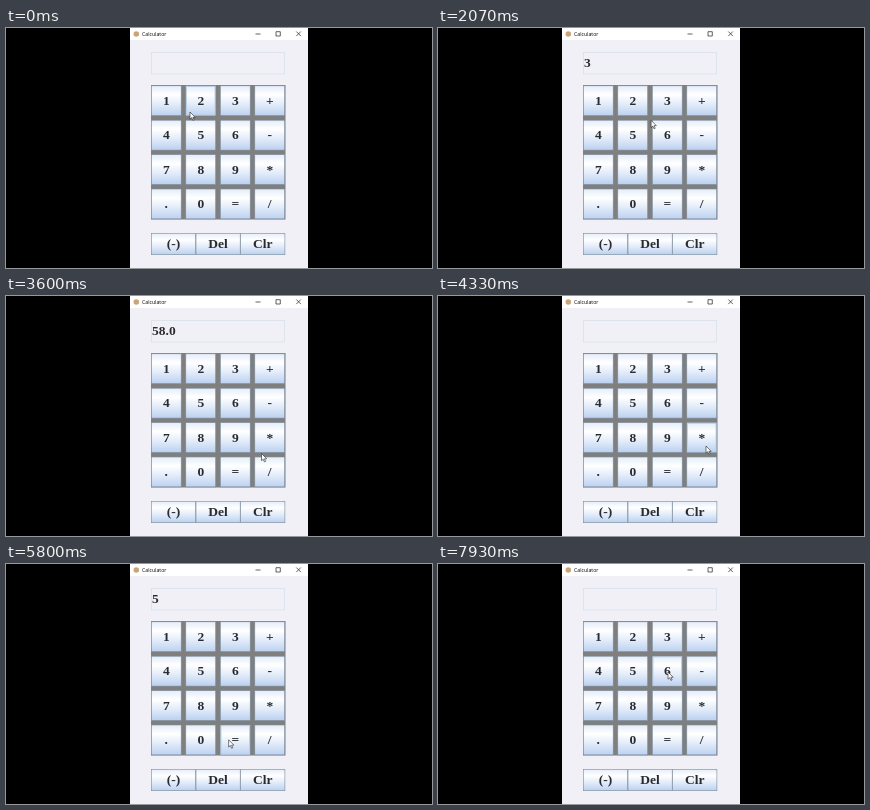
An HTML page that plays this animation: 426 px wide and 240 px high, repeating every 8 s.

```html
<!DOCTYPE html>
<html lang="en">
<head>
<meta charset="utf-8">
<title>Calculator</title>
<style>
  html, body { margin: 0; width: 100%; height: 100%; overflow: hidden; background: #000; }
  svg { display: block; width: 100vw; height: 100vh; }
  .label { font: bold 13.5px "Liberation Serif", serif; fill: #2b2b2f; }
  .mid { text-anchor: middle; }
  .title { font: 5.2px "Open Sans", sans-serif; fill: #000; }
  .line { fill: none; stroke: #222; stroke-width: .7; }
</style>
</head>
<body>
<svg id="stage" viewBox="0 0 426 240">
  <defs>
    <linearGradient id="face" x1="0" y1="0" x2="0" y2="1">
      <stop offset="0" stop-color="#e4edfa"/>
      <stop offset=".3" stop-color="#fff"/>
      <stop offset=".6" stop-color="#e4edfa"/>
      <stop offset="1" stop-color="#bbd1f0"/>
    </linearGradient>
  </defs>
</svg>
<script>
const stage = document.getElementById('stage');

function add(tag, attrs, text) {
  const node = document.createElementNS('http://www.w3.org/2000/svg', tag);
  for (const key in attrs) node.setAttribute(key, attrs[key]);
  if (text) node.textContent = text;
  return stage.appendChild(node);
}
const rect = (x, y, width, height, style) => add('rect', { x, y, width, height, ...style });

// Window
rect(124, 0, 178, 240, { fill: '#f1f0f7' });
rect(124, 0, 178, 12, { fill: '#fff' });
add('circle', { cx: 130.3, cy: 6, r: 2.8, fill: '#c9a57a' });
add('text', { x: 136, y: 7.9, class: 'title' }, 'Calculator');
add('path', { d: 'M249.5 6H254.5M270 3.7h4.3v4.3h-4.3zM290.3 3.5l4.6 4.6M294.9 3.5l-4.6 4.6', class: 'line' });

// Display and keypad
rect(145.5, 24.5, 133, 21.5, { fill: 'none', stroke: '#d3dfea', 'stroke-width': .7 });
const display = add('text', { x: 146, y: 39, class: 'label' });
rect(145, 57, 134.5, 134.5, { fill: '#7f7f80' });

const buttons = [];
function addButton(name, x, y, w, h, baseline) {
  const face = rect(x + .3, y + .3, w - .6, h - .6,
    { fill: 'url(#face)', stroke: '#7a8a99', 'stroke-width': .6 });
  const glow = rect(x + 1, y + 1, w - 2, h - 2,
    { fill: 'none', stroke: '#b8cfe5', 'stroke-width': .9 });
  add('text', { x: x + w / 2, y: baseline, class: 'label mid' }, name);
  buttons.push({ name, x, y, w, h, face, glow });
}
[...'123+456-789*.0=/'].forEach((name, i) => {
  const x = 145 + i % 4 * 34.5, y = 57.5 + Math.floor(i / 4) * 34.4;
  addButton(name, x, y, 30.5, 30.5, y + 19.5);
});
['(-)', 'Del', 'Clr'].forEach((name, i) => addButton(name, 145 + i * 44.7, 205, 44.8, 22, 220));

const pointer = add('path', {
  d: 'M0 0V7.2L1.7 5.7L2.9 8.4L4.1 7.9L2.9 5.3H5.2Z',
  fill: '#fff', stroke: '#222', 'stroke-width': .6, 'stroke-linejoin': 'round'
});

const LOOP = 8000, FPS = 15, HOLD = 120;
// Where and when the mouse button goes down; the keys follow from the places
const presses = [
  [-150, 184, 84], [270, 188, 78], [740, 165, 75], [1260, 268, 75],
  [1800, 231, 75], [2400, 162, 142], [3130, 223, 177], [3870, 268, 150],
  [5070, 201, 101], [5940, 223, 177], [7300, 263, 176], [8030, 230, 108]
].map(([time, x, y]) => ({ time, x, y }));

const contains = (b, { x, y }) => x >= b.x && x < b.x + b.w && y >= b.y && y < b.y + b.h;
const clamp = v => Math.min(1, Math.max(0, v));

function pointerAt(t) {
  const i = presses.findIndex(p => p.time > t);
  const from = presses[i - 1], to = presses[i];
  const arrive = to.time - 100, leave = Math.max(from.time + 150, arrive - 550);
  const k = clamp((t - leave) / (arrive - leave)), ease = k * k * (3 - 2 * k);
  return { x: from.x + (to.x - from.x) * ease, y: from.y + (to.y - from.y) * ease };
}

const operations = {
  '+': (a, b) => a + b, '-': (a, b) => a - b, '*': (a, b) => a * b, '/': (a, b) => a / b
};

function displayAt(t) {
  let entry = '', stored = 0, operator = '+';
  for (const press of presses.slice(1).filter(p => p.time + HOLD <= t)) {
    const { name } = buttons.find(b => contains(b, press));
    if (name === '=') {
      entry = operations[operator](stored, +entry).toFixed(1);
    } else if (operations[name]) {
      stored = +entry;
      operator = name;
      entry = '';
    } else {
      entry += name;
    }
  }
  return entry;
}

function draw(now) {
  const step = Math.floor(now % LOOP * FPS / 1000 + .06);
  const t = step * 1000 / FPS % LOOP;
  const tip = pointerAt(t);
  const pressed = presses.some(p => t >= p.time && t < p.time + HOLD);
  display.textContent = displayAt(t);
  for (const b of buttons) {
    const over = contains(b, tip);
    b.face.setAttribute('fill', over && pressed ? '#b8cfe5' : 'url(#face)');
    b.glow.setAttribute('visibility', over ? 'visible' : 'hidden');
  }
  pointer.setAttribute('transform', `translate(${tip.x} ${tip.y})`);
}

const start = performance.now();
function tick() {
  draw(performance.now() - start);
  requestAnimationFrame(tick);
}
tick();
</script>
</body>
</html>
```
